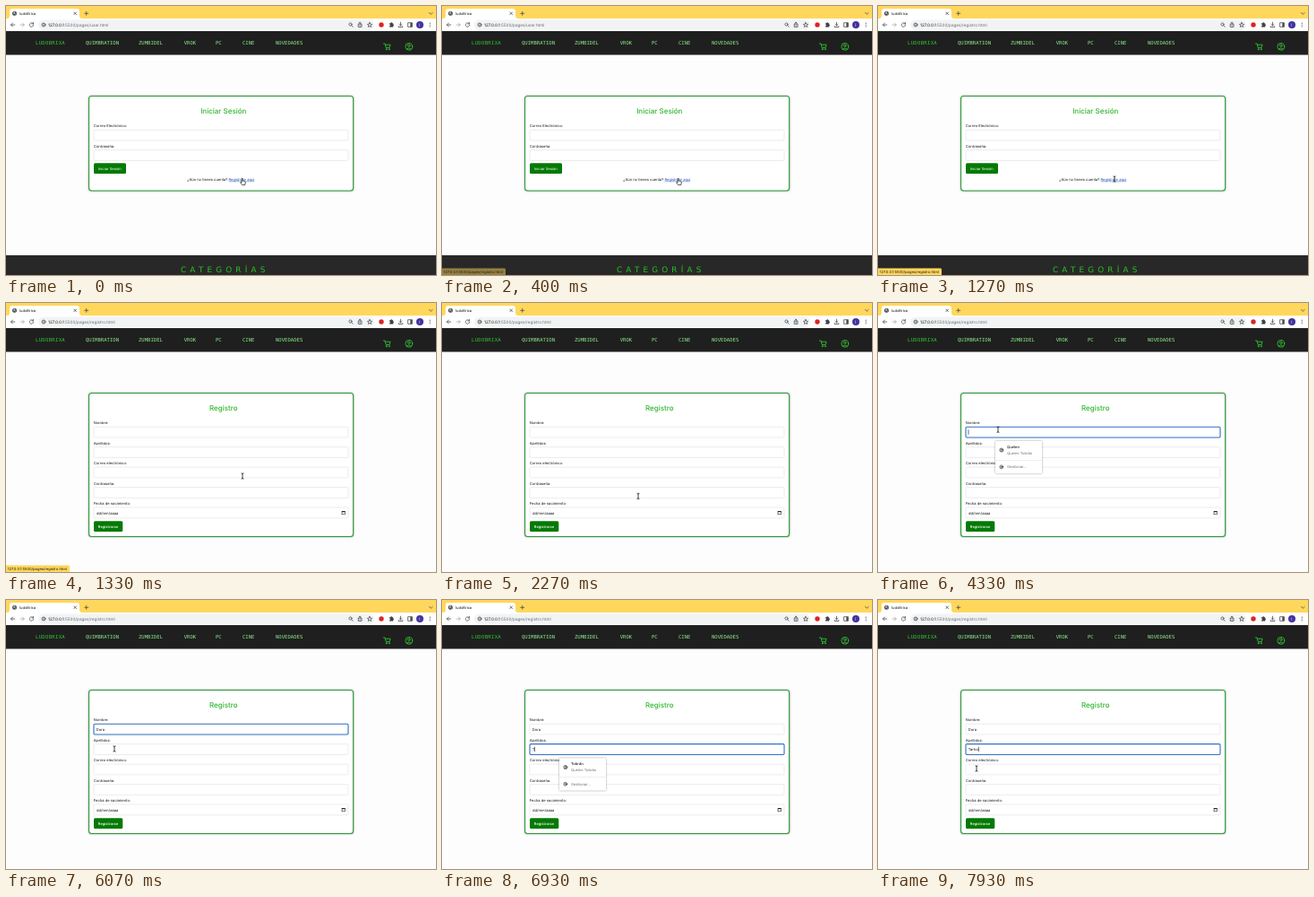
An HTML page for the animation above (8000 ms loop, 480 by 300 pixels).

```html
<!DOCTYPE html>
<html lang="es">
<head>
<meta charset="utf-8">
<title>ludoBrixa</title>
<style>
html, body { margin: 0; width: 100%; height: 100%; overflow: hidden; background: #fdfdfd; }
svg { display: block; width: 100vw; height: 100vh; }
text { font: 4.1px Inter, Roboto, sans-serif; fill: #151515; text-rendering: geometricPrecision; white-space: pre; }
.url { font-size: 4.65px; }
.title { font-size: 8px; font-weight: 500; fill: #2fb52f; text-anchor: middle; }
.nav { font: 5.6px "DejaVu Sans Mono", monospace; fill: #8ae88a; }
.nav.brand { fill: #2fc52f; letter-spacing: .3px; }
.footer { font: 8.8px "DejaVu Sans", sans-serif; letter-spacing: 4.2px; fill: #27c227; }
.gray { fill: #6a6e73; }
.white { fill: #fff; }
.mid { font-weight: 500; }
.line { fill: none; stroke: #4a4d51; stroke-width: .8; stroke-linecap: round; stroke-linejoin: round; }
.green { fill: none; stroke: #2fc52f; stroke-width: .9; stroke-linecap: round; stroke-linejoin: round; }
.field { fill: #fff; stroke: #dfdfdf; stroke-width: .6; }
.focus { fill: #fff; stroke: #3570c4; stroke-width: 1.1; }
.card { fill: #fff; stroke: #2f9a3a; stroke-width: 1.1; filter: drop-shadow(0 0 1.2px #0005); }
.popup { fill: #fff; filter: drop-shadow(0 .5px 1px #0006); }
</style>
</head>
<body>
<svg id="stage" viewBox="0 0 480 300" preserveAspectRatio="none"></svg>
<script>
const stage = document.getElementById('stage');
const FIELD_TOP = 138.2, FIELD_STEP = 22.45;

const text = (x, y, s, cls = '') => `<text x="${x}" y="${y}" class="${cls}">${s}</text>`;
const rect = (x, y, w, h, attrs = '') => `<rect x="${x}" y="${y}" width="${w}" height="${h}" ${attrs}/>`;
const circle = (x, y, r, attrs = 'class="line"') => `<circle cx="${x}" cy="${y}" r="${r}" ${attrs}/>`;
const path = (d, cls = 'line') => `<path d="${d}" class="${cls}"/>`;
const group = (id, body) => `<g id="${id}">${body}</g>`;
const fieldY = i => FIELD_TOP + i * FIELD_STEP;

const browser = () =>
  rect(0, 0, 480, 15, 'fill="#ffd75c"') +
  path('M1 14Q4 14 4 11V6Q4 3 7 3H79Q82 3 82 6V11Q82 14 85 14Z', 'white') +
  circle(9.5, 8.3, 2.5, 'fill="#4a4d51"') +
  '<path d="M8 7.2L10 6.8L9.2 8.6L8.2 8.4M10.2 9.2L11.2 8.6" fill="none" stroke="#fff" stroke-width=".6"/>' +
  text(15, 9.8, 'ludoBrixa') +
  path('M75.9 7L78.5 9.6M78.5 7L75.9 9.6') +
  path('M87.7 8.3H91.7M89.7 6.3V10.3') +
  path('M472.5 7.5L474.3 9.2L476.1 7.5') +
  rect(0, 14, 480, 14, 'fill="#fff"') +
  path('M9.8 21H5.5M7.5 19L5.5 21L7.5 23') +
  '<g opacity=".45">' + path('M16 21H20.3M18.3 19L20.3 21L18.3 23') + '</g>' +
  path('M30.2 19.6A2.2 2.2 0 1 0 30.7 21.4M30.6 18.4V20H29') +
  rect(36, 15.5, 375, 11, 'rx="5.5" fill="#f1f3f4"') +
  circle(42, 21, 2) + path('M42 20.8V22M42 19.8V19.9') +
  '<text x="47" y="22.7" class="url">127.0.0.1<tspan class="gray" id="address"></tspan></text>' +
  circle(384.5, 20.5, 1.6) + path('M385.8 21.8L387.2 23.2') +
  path('M394 20H393.2V23.4H397V20H396.2M395.1 22V18.2M394 19.2L395.1 18.2L396.2 19.2') +
  path('M406 18.5L406.8 20.2L408.6 20.4L407.2 21.6L407.6 23.4L406 22.5L404.4 23.4L404.8 21.6L403.4 20.4L405.2 20.2Z') +
  circle(419, 21, 2.7, 'fill="#e02222"') +
  '<path d="M428 19.2H429.3A1 1 0 0 1 431.3 19.2H432.2V20.5A1 1 0 0 1 432.2 22.4V23.6H428V22.3A.9 .9 0 0 0 428 20.5Z" fill="#3f4246"/>' +
  path('M440.5 18.2V21.8M438.9 20.4L440.5 21.9L442.1 20.4M438.2 22.5V23.6H442.8V22.5') +
  rect(449, 18.7, 4.4, 4.6, 'class="line"') + rect(451.3, 18.7, 2.1, 4.6, 'fill="#4a4d51"') +
  circle(462, 21, 4, 'fill="#4332a0"') + text(461.1, 22.4, 'j', 'white') +
  [19.2, 21, 22.8].map(y => circle(473.2, y, .6, 'fill="#4a4d51"')).join('');

const siteHeader = () =>
  rect(0, 28, 480, 26.5, 'fill="#1f1f1f"') +
  text(33, 43.3, 'LUDOBRIXA', 'nav brand') +
  [[89, 'QUIMBRATION'], [148, 'ZUMBIDEL'], [198.7, 'VROK'], [234, 'PC'], [264, 'CINE'], [301, 'NOVEDADES']]
    .map(([x, s]) => text(x, 43.3, s, 'nav')).join('') +
  path('M421.5 42H423L424.2 46.4H428.2L429.1 43.2H423.4', 'green') +
  circle(424.7, 48.2, .6, 'class="green"') + circle(427.8, 48.2, .6, 'class="green"') +
  circle(449.8, 45.3, 3.9, 'class="green"') + circle(449.8, 44.2, 1.3, 'class="green"') +
  path('M447.3 48.1Q449.8 45.5 452.3 48.1', 'green');

const card = height => rect(92.6, 100.5, 295, height, 'rx="3" class="card"');
const input = i => rect(98, fieldY(i), 284, 11.8, 'rx="1.2" class="field"');
const labelled = (s, i) => text(97.8, 135.2 + i * FIELD_STEP, s) + input(i);
const button = (y, w, s, cls) => rect(98, y, w, 11.8, 'rx="1.5" fill="#047a04"') + text(102.8, y + 7.4, s, cls);

const loginPage = () =>
  card(105.5) + text(242.8, 120, 'Iniciar Sesión', 'title') +
  ['Correo Electrónico:', 'Contraseña:'].map(labelled).join('') +
  button(175.2, 36, 'Iniciar Sesión', 'white') +
  text(202.3, 194.7, '¿Aún no tienes cuenta?') +
  '<text x="248.5" y="194.7" style="fill:#1c4fb0;text-decoration:underline">Regístrate aquí</text>' +
  rect(0, 278, 480, 22, 'fill="#282828"') + text(195, 296.5, 'CATEGORÍAS', 'footer');

const registerPage = () =>
  card(160) + text(242.8, 120, 'Registro', 'title') +
  ['Nombre:', 'Apellidos:', 'Correo electrónico:', 'Contraseña:', 'Fecha de nacimiento:'].map(labelled).join('') +
  text(101, 235.6, 'dd/mm/aaaa') +
  rect(375, 232.3, 3.4, 3.5, 'fill="none" stroke="#222" stroke-width=".6"') +
  rect(375, 232, 3.4, 1.2, 'fill="#222"') +
  button(243.2, 32.3, 'Registrarse', 'white mid') +
  rect(98, 0, 284, 11.8, 'id="focus" rx="1.2" class="focus"') +
  '<text id="first" x="100.7" y="145.6"></text><text id="last" x="100.7" y="168.1"></text>' +
  rect(0, 0, .6, 5.4, 'id="caret" fill="#111"') +
  group('popup',
    rect(131, 153.8, 52, 36.2, 'rx="1.2" class="popup"') +
    circle(137.8, 164, 2) + circle(137.8, 163.4, .6) + path('M136.4 165.4Q137.8 164.2 139.2 165.4') +
    '<text id="hint" x="144" y="161.9" class="mid"></text>' +
    text(144, 169, 'Quelmi Tobrán', 'gray') +
    rect(131, 175, 52, .5, 'fill="#dedede"') +
    circle(137.8, 182.8, 1.9) + circle(137.8, 182.8, .7) +
    text(144, 184.4, 'Gestionar...', 'gray'));

stage.innerHTML =
  rect(0, 0, 480, 300, 'fill="#fdfdfd"') + browser() + siteHeader() +
  group('login', loginPage()) + group('register', registerPage()) +
  group('status', '<path d="M0 292.6H69.5Q71 292.6 71 294V300H0Z" fill="#ffd75c"/>' +
    text(1.8, 297.8, '127.0.0.1:5500/pages/registro.html')) +
  group('hand', '<path d="M263.1 192.4Q264 192 264.3 193V195L266.6 195.6Q267.5 196 267.3 197L266.7 199.6H263.7L261.6 197Q261.6 196 263.1 196.8Z" fill="#fff" stroke="#111" stroke-width=".7"/>') +
  group('beam', '<path d="M-1.4 -3.2Q0 -3.2 0 -2.2Q0 -3.2 1.4 -3.2M0 -2.4V2.4M-1.4 3.2Q0 3.2 0 2.2Q0 3.2 1.4 3.2" fill="none" stroke="#111" stroke-width=".8"/>');

const el = Object.fromEntries([...stage.querySelectorAll('[id]')].map(e => [e.id, e]));

// pointer: [ms, x, y]
const route = [
  [1330, 264, 193], [2000, 219.5, 216], [2270, 219, 215.4], [3070, 134, 140], [3200, 134, 141.2],
  [5870, 134, 141.2], [6070, 121, 166], [7600, 121, 166], [7930, 110, 188]
];
const typing = {
  first: { word: 'Dora', keys: [5070, 5270, 5330, 5470] },
  last: { word: 'Tarbo', keys: [6930, 7130, 7200, 7330, 7600] }
};
const LOOP = 8000, TICK = 1000 / 15, BLINK = 530;

const between = (t, a, b) => t >= a - 5 && t < b - 5;
const ramp = (t, a, b) => Math.min(1, Math.max(0, (t - a) / (b - a)));
const show = (e, on) => e.setAttribute('visibility', on ? 'visible' : 'hidden');

function pointerAt(t) {
  let [, x, y] = route[0];
  for (let i = 1; i < route.length; i++) {
    const [t0, x0, y0] = route[i - 1], [t1, x1, y1] = route[i];
    if (t < t0) break;
    const p = ramp(t, t0, t1), k = p * p * (3 - 2 * p);
    x = x0 + (x1 - x0) * k;
    y = y0 + (y1 - y0) * k;
  }
  return [x, y];
}

function render(now) {
  // the picture advances 15 times a second
  const t = Math.floor((now % LOOP + 4) / TICK) * TICK;
  const registered = t >= 1325, navigated = t >= 1195;

  el.address.textContent = ':5500/pages/' + (navigated ? 'registro' : 'user') + '.html';
  show(el.login, !registered);
  el.register.style.display = registered ? '' : 'none';
  el.status.setAttribute('opacity', ramp(t, 270, 530) * (1 - ramp(t, 1730, 2000)));

  show(el.hand, !navigated);
  const pointerHidden = between(t, 5070, 5870) || between(t, 6930, 7670);
  show(el.beam, navigated && !pointerHidden);
  el.beam.setAttribute('transform', `translate(${pointerAt(t)})`);

  const second = t >= 6325, focused = t >= 4195;
  const active = second ? 'last' : 'first', row = second ? 1 : 0;
  for (const id in typing) {
    const { word, keys } = typing[id];
    el[id].textContent = word.slice(0, keys.filter(k => t >= k - 5).length);
  }
  show(el.focus, focused);
  el.focus.setAttribute('y', fieldY(row));

  const lastKey = Math.max(second ? 6330 : 4330, ...typing[active].keys.filter(k => t >= k - 5));
  const caretOn = focused && Math.floor(Math.max(0, t - lastKey + 5) / BLINK) % 2 === 0;
  show(el.caret, caretOn);
  if (registered) {
    const width = el[active].textContent ? el[active].getComputedTextLength() : 0;
    el.caret.setAttribute('x', 100.7 + width);
    el.caret.setAttribute('y', fieldY(row) + 3.1);
  }

  show(el.popup, between(t, 4270, 5130) || between(t, 6330, 7130));
  el.popup.setAttribute('transform', `translate(0 ${row * FIELD_STEP})`);
  el.hint.textContent = second ? 'Tobrán' : 'Quelmi';
}

const start = performance.now();
(function loop() {
  render(performance.now() - start);
  requestAnimationFrame(loop);
})();
</script>
</body>
</html>
```
